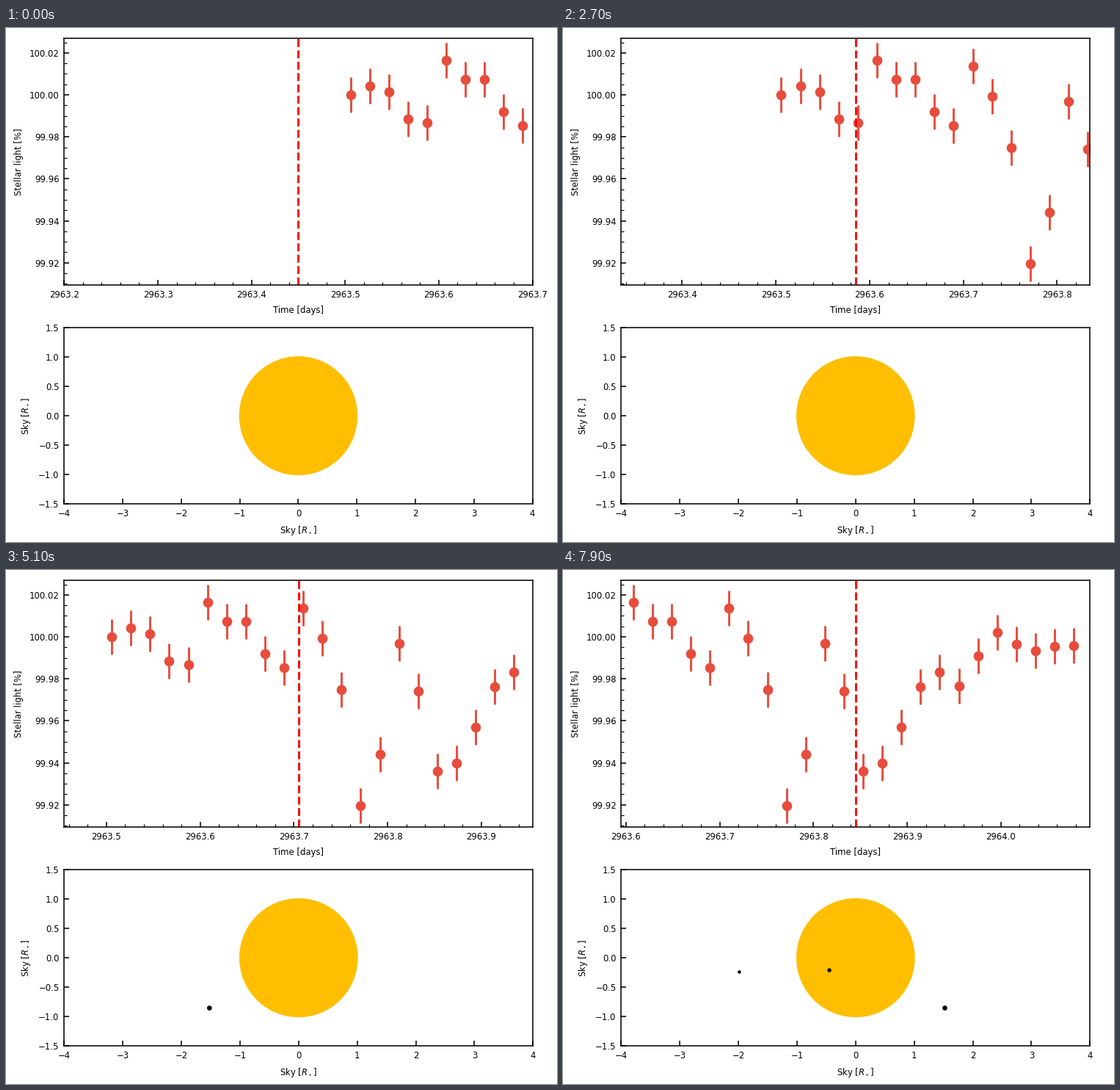
Animation, 751 px wide and 700 px high, one loop 8 s. Source, as a matplotlib script:

```python
import numpy as np
import matplotlib.pyplot as plt
from matplotlib.animation import FuncAnimation
from matplotlib.collections import LineCollection
from matplotlib.patches import Circle
from matplotlib.ticker import AutoMinorLocator, MultipleLocator

W, H, DPI = 751, 700, 140
FRAMES, INTERVAL = 80, 100
T_START, T_STEP, HALF = 2963.45, 0.005, 0.25
RED = "#E74C3C"

plt.rcParams.update({
    "font.family": "DejaVu Sans", "font.size": 6,
    "axes.labelsize": 6, "xtick.labelsize": 6, "ytick.labelsize": 6,
    "xtick.direction": "in", "ytick.direction": "in",
})

# Light curve: deviations from 100 % in thousandths of a percent
dev = np.array([0, 4.2, 1.4, -11.6, -13.4, 16.6, 7.2, 7.5, -8.1, -14.7,
                13.8, -0.7, -25.3, -80.3, -55.9, -3.2, -26, -64, -60.1, -43,
                -23.8, -16.7, -23.4, -9.2, 2.2, -3.4, -6.5, -4.6, -4.3])
flux = 100 + dev / 1000
time = 2963.5057 + 0.02043 * np.arange(len(dev))
ERR = 0.0084

# Planets: orbit size, impact parameter, mid-transit step, radius
PLANETS = [(21.4, 0.857, 64.99, 0.042),
           (7.175, 0.2127, 81.385, 0.034),
           (15.1, 0.2435, 94.35, 0.028)]


def box(left, top, right, bottom):
    """Axes rectangle from pixel edges measured from the top left."""
    return [left / W, 1 - bottom / H, (right - left) / W, (bottom - top) / H]


def orbit(a, b, mid, i):
    phase = 0.5036 * a ** -1.5 * (i - mid)
    return a * np.sin(phase), -b * np.cos(phase)


fig = plt.figure(figsize=((W + 1e-6) / DPI, H / DPI), dpi=DPI, facecolor="white")
light = fig.add_axes(box(79.4, 13.6, 718.2, 350.3))
sky = fig.add_axes(box(79.4, 408, 718.2, 648.2))

light.set(ylim=(99.9093, 100.0271), xlabel="Time [days]",
          ylabel="Stellar light [%]")
light.xaxis.set_major_locator(MultipleLocator(0.1))
light.yaxis.set_major_locator(MultipleLocator(0.02))
light.xaxis.set_minor_locator(AutoMinorLocator(5))
light.yaxis.set_minor_locator(AutoMinorLocator(4))
light.xaxis.set_major_formatter("{x:.1f}")
light.yaxis.set_major_formatter("{x:.2f}")

sky.set(xlim=(-4, 4), ylim=(-1.5, 1.5),
        xlabel=r"Sky [$R_\star$]", ylabel=r"Sky [$R_\star$]")
sky.xaxis.set_major_locator(MultipleLocator(1))
sky.yaxis.set_major_locator(MultipleLocator(0.5))

bars = LineCollection([], colors=RED, linewidths=1.5, zorder=2)
light.add_collection(bars, autolim=False)
dots, = light.plot([], [], "o", color=RED, ms=6, zorder=2.1)
now = light.axvline(T_START, color="red", ls="--", lw=1.5, zorder=2.2)

sky.add_patch(Circle((0, 0), 1, color="#FFBF00", lw=1))
discs = [sky.add_patch(Circle((-9, 0), r, color="black", lw=0, zorder=3))
         for *_, r in PLANETS]


def update(i):
    t = T_START + T_STEP * i
    light.set_xlim(t - HALF, t + HALF)
    now.set_xdata([t, t])

    seen = np.abs(time - t) <= HALF
    x, y = time[seen], flux[seen]
    dots.set_data(x, y)
    bars.set_segments([[(u, v - ERR), (u, v + ERR)] for u, v in zip(x, y)])

    # A tick label on the right edge narrows the panels slightly
    right = 717.5 if i % 20 == 0 else 718.2
    light.set_position(box(79.4, 13.6, right, 350.3))
    sky.set_position(box(79.4, 408, right, 648.2))

    for disc, (a, b, mid, _) in zip(discs, PLANETS):
        disc.center = orbit(a, b, mid, i)
    return []


anim = FuncAnimation(fig, update, frames=FRAMES, interval=INTERVAL,
                     init_func=lambda: update(0), repeat=True, repeat_delay=0)
plt.show()
```
